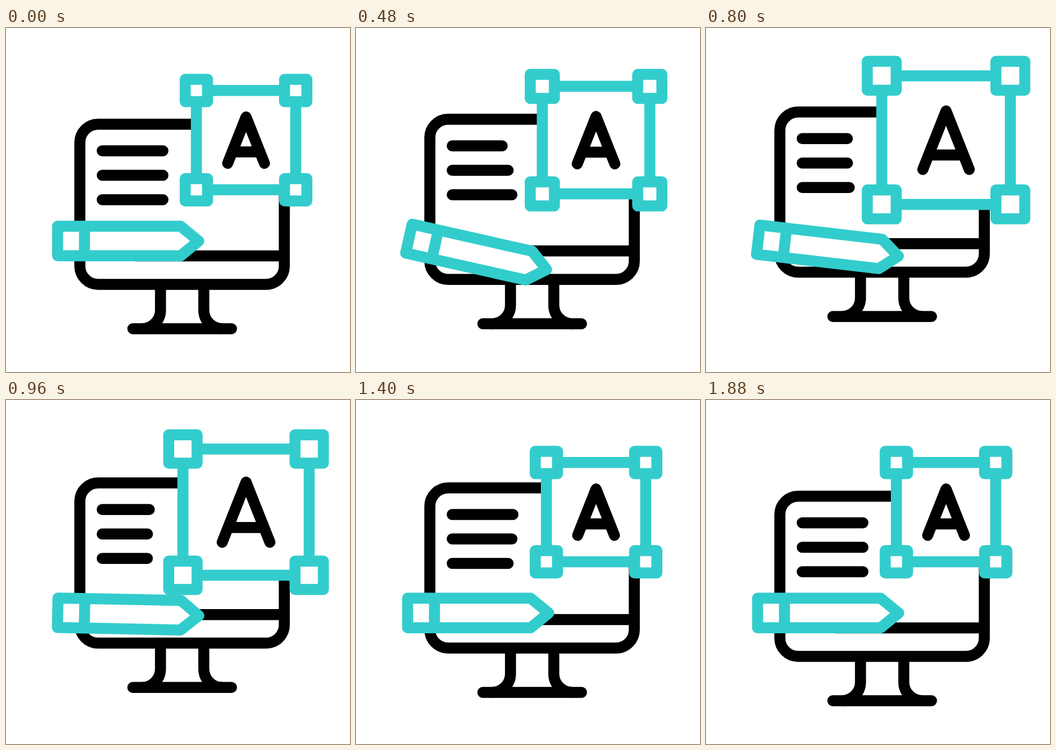
Recreate the animation shown at these times as an HTML page. Size 640 by 640 pixels, loop 2 s.

```html
<!DOCTYPE html>
<html lang="en">
<head>
<meta charset="utf-8">
<title>Design screen</title>
<style>
  html, body { margin: 0; width: 100%; height: 100%; overflow: hidden; background: #fff; }
  svg { display: block; width: 640px; height: 640px; }
  svg * { vector-effect: non-scaling-stroke; }
  .ink, .teal { fill: none; stroke: #000; stroke-width: 20.5; stroke-linejoin: round; }
  .teal { fill: #fff; stroke: #3cc; }
  .cap { stroke-linecap: round; }
</style>
</head>
<body>
<svg viewBox="0 0 640 640">
  <g id="monitor" class="ink">
    <rect x="137.4" y="179" width="380.4" height="298" rx="34"/>
    <path d="M240 424H518M287.4 477V525A34.5 34.5 0 0 1 253 559.5M368 477V525A34.5 34.5 0 0 0 402.4 559.5"/>
    <path class="cap" d="M236 559.5H419.5"/>
    <path class="line cap"/>
    <path class="line cap"/>
    <path class="line cap"/>
  </g>
  <g id="frame" class="teal">
    <rect x="-92.4" y="-92.4" width="184.8" height="184.8"/>
  </g>
  <path id="letter" class="ink cap" d="M-34.2 43.2L0 -43L34.2 43.2M-25.8 22H25.8"/>
  <g id="pen" class="teal">
    <path d="M96 368.8H325L358.5 396.3L325 423.7H96ZM146 368.8V423.7"/>
  </g>
</svg>
<script>
const $ = id => document.getElementById(id);
const lines = document.querySelectorAll('.line');

for (const x of [-92.4, 92.4]) for (const y of [-92.4, 92.4]) {
  const handle = document.createElementNS('http://www.w3.org/2000/svg', 'rect');
  const attrs = { x: x - 20.75, y: y - 20.75, width: 41.5, height: 41.5 };
  for (const k in attrs) handle.setAttribute(k, attrs[k]);
  $('frame').append(handle);
}

// Symmetric cubic-bezier(a, 0, 1 - a, 1), solved by bisection
function ease(u, a) {
  if (u <= 0) return 0;
  if (u >= 1) return 1;
  let lo = 0, hi = 1, p;
  for (let i = 0; i < 24; i++) {
    p = (lo + hi) / 2;
    const q = 1 - p;
    const x = 3 * a * p * q * q + 3 * (1 - a) * p * p * q + p * p * p;
    if (x < u) lo = p; else hi = p;
  }
  return p * p * (3 - 2 * p);
}

// Goes 0 to 1 during t0..t1 and back during t2..t3
const swing = (t, t0, t1, t2, t3, a = 0.5, b = a) =>
  ease((t - t0) / (t1 - t0), a) - ease((t - t2) / (t3 - t2), b);

const move = (el, value) => el.setAttribute('transform', value);
const zoom = (id, k) => move($(id), `translate(446.6 208.6) scale(${1 + 0.297 * k})`);

function draw() {
  const t = Math.floor(performance.now() % 2000 / 40) * 40;
  move($('monitor'), `translate(0 ${-24.7 * swing(t, 78, 1000, 1000, 1920)})`);
  lines.forEach((line, i) => {
    const s = t - 120 * i;
    const end = 292 - 29 * swing(s, 120, 720, 800, 1400);
    line.setAttribute('d', `M179 ${228.5 + 45.5 * i}H${end}`);
  });
  zoom('frame', swing(t, 243, 848, 850, 1385, 0.55, 0.42));
  zoom('letter', swing(t, 350, 960, 960, 1390));
  move($('pen'), `rotate(${13.3 * swing(t, 75, 545, 545, 1055, 0.35)} 117 405)`);
  requestAnimationFrame(draw);
}
draw();
</script>
</body>
</html>
```
